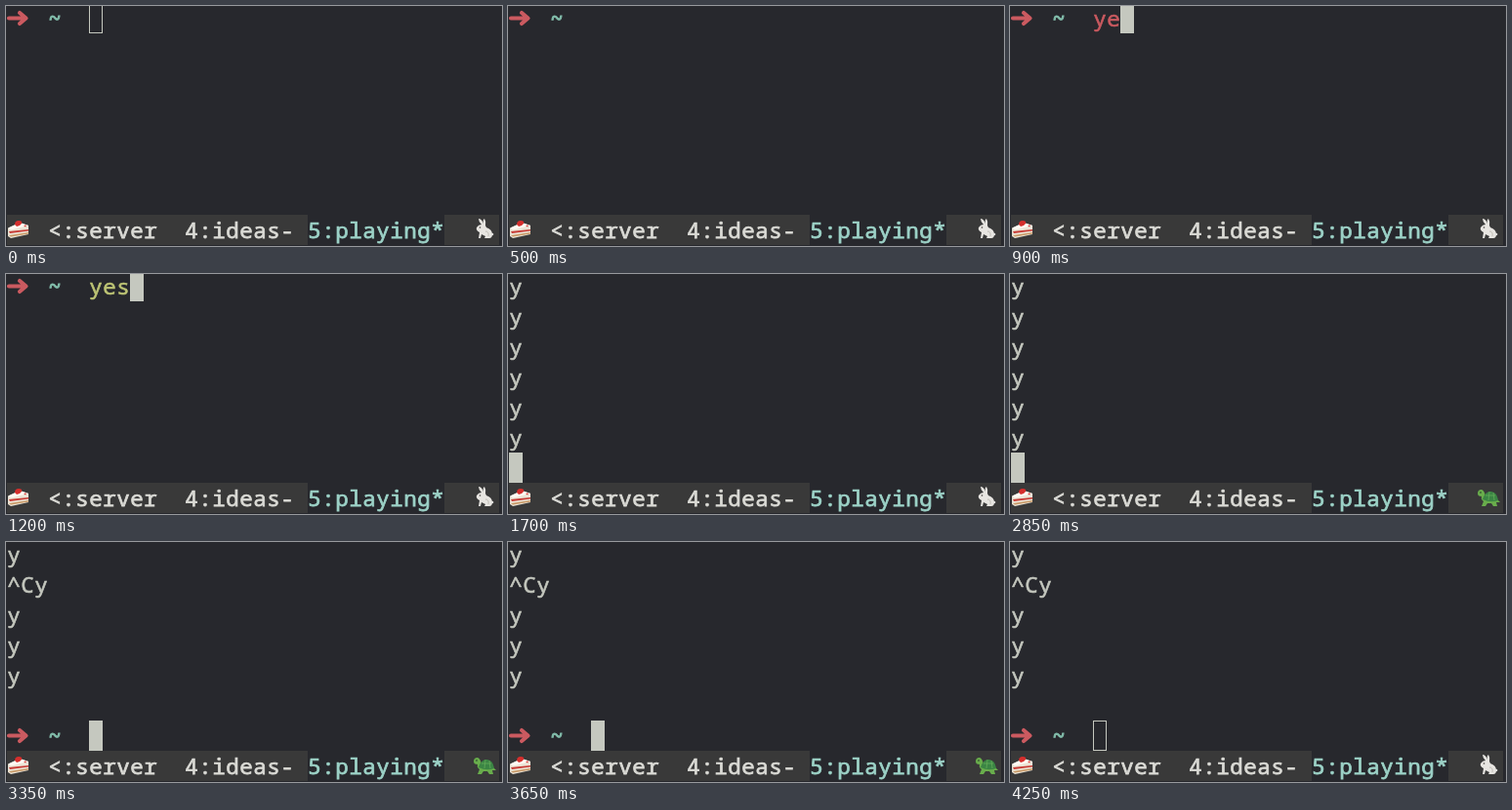
Animation of 508x246 px, one loop 4.3 s. Source, as an HTML page:

```html
<!DOCTYPE html>
<html lang="en">
<head>
<meta charset="utf-8">
<title>Terminal</title>
<style>
html, body { margin: 0; width: 100%; height: 100%; overflow: hidden; background: #27282d; }
svg { display: block; width: 100vw; height: 100vh; }
text {
  font: 22.5px "Noto Sans Mono", "DejaVu Sans Mono", monospace; letter-spacing: .5px; white-space: pre;
  color: #c5c8bf; fill: currentColor; stroke: currentColor; stroke-width: .6px;
}
.status { color: #dbdbd6; stroke-width: .75px; }
.active { color: #9dd3c8; stroke-width: .75px; }
.path { color: #82bdab; stroke-width: 1px; }
</style>
</head>
<body>
<svg viewBox="0 0 508 246">
  <rect width="508" height="246" fill="#27282d"/>
  <g id="output"></g>
  <g id="prompt">
    <path d="M3 12.5H19M14 7L20.5 12.5L14 18" fill="none" stroke="#cb5a60" stroke-width="4.2" stroke-linecap="round" stroke-linejoin="round"/>
    <text class="path" x="43.3" y="21">~</text>
    <text id="command" x="85.3" y="21"></text>
  </g>
  <rect id="cursor"/>

  <path d="M1 214H309V245H1ZM449 214H505V245H449Z" fill="#393939"/>
  <text class="status" x="43.3" y="238">&lt;:server</text>
  <text class="status" x="183.3" y="238">4:ideas-</text>
  <text class="active" x="309.3" y="238">5:playing*</text>

  <g id="cake">
    <path d="M2 228L14 222L23 225V234L5 238L2 236Z" fill="#ece4d6"/>
    <path d="M3 231L23 229V230.5L4 233Z" fill="#c73a35"/>
    <path d="M3 235L23 232V233.5L5 236.5Z" fill="#c99a68"/>
    <path d="M2 227.5L14 222L23 225L5 229.5Z" fill="#fffaf3"/>
    <path d="M9 224Q9 220 13 220Q17 220 16 223Q14 226 11 226Z" fill="#d52f2d"/>
    <path d="M18 225L21 224.5L20 226.5Z" fill="#d52f2d"/>
  </g>
  <g id="rabbit" fill="#e7e5e1">
    <path d="M487 224Q484 221 484 218Q487 218 489 223Q488 219 490 218Q492 221 491 225L492 227Q498 229 498 234Q498 238 495 238H490L491 236L487 234L486 238H484L485 232Q481 230 482 227Q484 224 487 224Z"/>
    <circle cx="498" cy="234" r="1.3"/>
    <circle cx="485.5" cy="227" r=".8" fill="#403b38"/>
    <path d="M491 231Q495 231 494 236" fill="none" stroke="#b5b1aa" stroke-width=".8"/>
  </g>
  <g id="turtle">
    <path d="M479 225Q479 221 483 221Q486 222 487 228L498 230L502 234L498 234L499 238H495L493 235H489L487 238H483L485 233Q482 231 483 228Q479 228 479 225Z" fill="#69ad4c"/>
    <path d="M484 231Q487 222 493 223Q499 224 500 232Q492 235 484 231Z" fill="#3b8544"/>
    <path d="M487 227H497M491 223L490 232M495 224L496 232" fill="none" stroke="#62aa59" stroke-width=".8"/>
    <circle cx="482" cy="224" r=".8" fill="#203425"/>
  </g>
</svg>
<script>
const LOOP = 4300, CELL = 14, ROW = 31, INK = "#c5c8bf";
const RUN = 1450, STOP = 3350, BLUR = 4150;
const TURTLE = [2850, 3950];
const keys = [800, 900, 1050];
const $ = id => document.getElementById(id);
const between = (t, a, b) => t >= a && t < b;
const show = (node, on) => node.setAttribute("display", on ? "inline" : "none");

const lines = Array.from({ length: 6 }, (_, row) => {
  const line = document.createElementNS("http://www.w3.org/2000/svg", "text");
  line.setAttribute("x", 1.3);
  line.setAttribute("y", 21 + row * ROW);
  $("output").append(line);
  return line;
});

function setCursor(col, row, hollow) {
  const inset = hollow ? 0.5 : 0;
  const top = row * ROW - 3, bottom = 28 + row * ROW;
  const attrs = {
    x: 1 + col * CELL + inset, y: top + inset,
    width: CELL - 2 * inset, height: bottom - top - 2 * inset,
    fill: hollow ? "none" : INK, stroke: hollow ? INK : "none"
  };
  for (const name in attrs) $("cursor").setAttribute(name, attrs[name]);
}

function draw(t) {
  const running = between(t, RUN, STOP), done = t >= STOP;
  const typed = done ? 0 : keys.filter(k => t >= k).length;

  lines.forEach((line, row) => {
    line.textContent = running ? "y" : done ? ["y", "^Cy", "y", "y", "y", ""][row] : "";
  });
  show($("prompt"), !running);
  $("prompt").setAttribute("transform", `translate(0 ${done ? 6 * ROW : 0})`);
  $("command").textContent = "yes".slice(0, typed);
  $("command").style.color = typed === 3 ? "#bec575" : "#cb5a60";

  setCursor(running ? 0 : 6 + typed, running || done ? 6 : 0, t < 100 || t >= BLUR);
  show($("cursor"), !between(t, 400, 700));

  const slow = between(t, ...TURTLE);
  show($("turtle"), slow);
  show($("rabbit"), !slow);
}

const start = performance.now();
function tick() {
  draw((performance.now() - start) % LOOP);
  requestAnimationFrame(tick);
}
tick();
</script>
</body>
</html>
```
